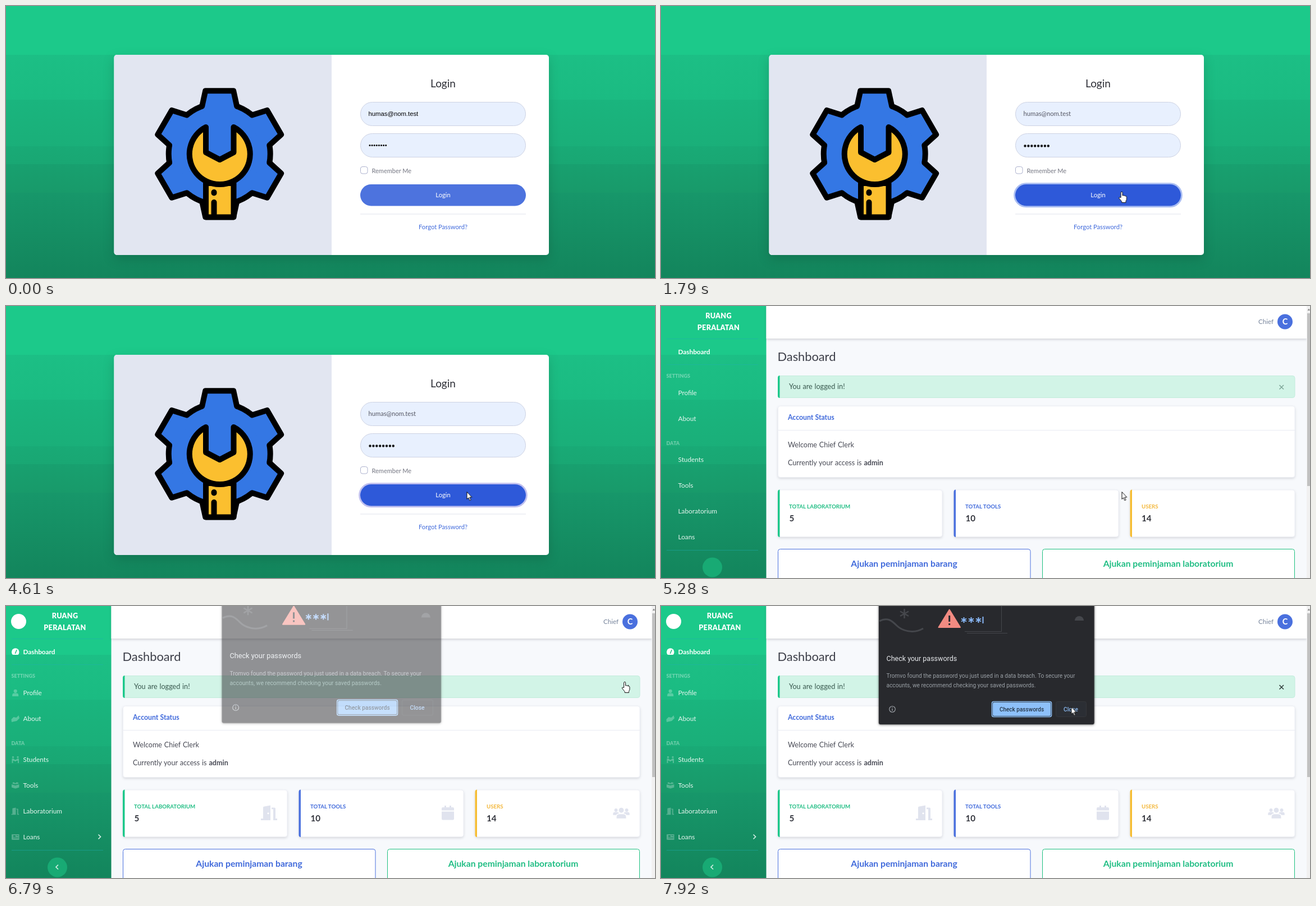
Write an HTML page that moves like this. It is 1156 px wide and 485 px high and loops after 7990 ms.

```html
<!DOCTYPE html>
<html lang="en">
<head>
<meta charset="utf-8">
<title>Login to dashboard</title>
<style>
html, body { margin: 0; width: 100%; height: 100%; overflow: hidden; }
svg {
  display: block; width: 100vw; height: 100vh;
  background: linear-gradient(#1cc98a 87px, #1cbf85 87px, #1bbb82 167px, #1ab57e 167px, #1aaf79 250px,
    #19aa76 250px, #19a773 282px, #18a06f 282px, #189a6a 333px, #17976a 333px, #13855c 485px);
  font-family: Lato, "Open Sans", sans-serif;
}
text { white-space: pre; }
.mid { text-anchor: middle; }
.b { font-weight: 700; }
.white { fill: #fff; }
.blue { fill: #3f69db; }
.green { fill: #1fbd83; }
.amber { fill: #f3b73a; }
.body { font-size: 12.6px; word-spacing: .6px; fill: #484a55; }
.small { font-size: 11.2px; }
.brand { font-size: 12.6px; font-weight: 900; letter-spacing: .3px; }
.nav { font-size: 11.8px; fill: #e6f6ef; }
.head { font-size: 9px; font-weight: 900; fill: #fff; opacity: .36; }
.label { font-size: 9.7px; font-weight: 700; }
.value { font-size: 15.2px; font-weight: 700; fill: #33353d; }
.cta { font-size: 15.7px; font-weight: 700; }
.card { fill: #fff; stroke: #edeff5; filter: drop-shadow(0 2px 2px rgba(58, 59, 69, .16)); }
.panel { filter: drop-shadow(0 7px 10px rgba(0, 0, 0, .15)); }
.field { fill: #e8f0fe; stroke: #cdd2e3; }
.dots { stroke: #111; stroke-linecap: round; }
.rule { stroke: #1eaeb0; stroke-opacity: .5; }
.black { fill: none; stroke: #000; stroke-width: 10; stroke-linejoin: round; stroke-linecap: round; }
.sheet { fill: #28292d; filter: drop-shadow(0 0 1px rgba(0, 0, 0, .6)) drop-shadow(0 1px 2px rgba(0, 0, 0, .4)); }
.dialog-text { font-family: Roboto, "Open Sans", sans-serif; }

/* 1% of the loop is 79.9 ms */
.login, .dash, .before, .after, .icons, .brand-box, .thumb, .cross, .dialog, .close-bg, .cursor, .arrow, .hand {
  animation: 7990ms step-end infinite;
}
.btn, .ring { animation: 7990ms linear infinite; }

.login { animation-name: leave; }
.dash { animation-name: enter; }
@keyframes leave { 0% { visibility: visible } 66.08%, 100% { visibility: hidden } }
@keyframes enter { 0% { visibility: hidden } 66.08%, 100% { visibility: visible } }

.before { animation-name: before; }
.after { animation-name: after; }
@keyframes before { 0% { opacity: 1 } 18.77%, 100% { opacity: 0 } }
@keyframes after { 0% { opacity: 0 } 18.77%, 100% { opacity: 1 } }

.btn { animation-name: hover; }
@keyframes hover { 0%, 11.2% { fill: #4d73de } 13.1%, 100% { fill: #2e59d9 } }
.ring { animation-name: focus; }
@keyframes focus {
  0%, 18.7% { stroke: #a9bdf2; opacity: 0 }
  20.6%, 56.8% { stroke: #a9bdf2; opacity: 1 }
  57.6%, 100% { stroke: #bfbfef; opacity: 1 }
}

.icons { animation-name: icons; }
@keyframes icons { 0% { opacity: 0 } 79.84%, 100% { opacity: 1 } }
.brand-box { animation-name: nudge; }
@keyframes nudge { 0% { transform: translateX(-2.5px) } 79.84%, 100% { transform: none } }
.thumb { animation-name: thumb; }
@keyframes thumb { 0% { height: 308px } 69.46%, 100% { height: 292px } }
.cross { animation-name: cross; }
@keyframes cross { 0% { stroke: #7ea597 } 81.6%, 100% { stroke: #2c3b36 } }

.dialog { animation-name: pop; transform-origin: 579.5px 0; }
@keyframes pop {
  0% { opacity: 0 }
  84.1% { opacity: .03; transform: translateY(-10px) scale(1.03) }
  84.98% { opacity: .5; transform: translateY(-6px) scale(1.017) }
  85.85% { opacity: .97; transform: translateY(-2px) scale(1.005) }
  86.6% { opacity: 1; transform: translateY(-.7px) scale(1.002) }
  87.35%, 100% { opacity: 1; transform: none }
}
.close-bg { animation-name: close-bg; }
@keyframes close-bg { 0% { fill: #28292d } 98.24%, 100% { fill: #2b2e34 } }

.cursor { animation-name: move; }
@keyframes move {
  0% { opacity: 0; transform: translate(1033px, 425px) }
  6.5% { opacity: 1; transform: translate(1033px, 425px) }
  7.19% { opacity: 1; transform: translate(960px, 382px) }
  7.88% { opacity: 1; transform: translate(922px, 361px) }
  11.26% { opacity: 1; transform: translate(905px, 354px) }
  12.07% { opacity: 1; transform: translate(870px, 343px) }
  12.95% { opacity: 1; transform: translate(845px, 336px) }
  13.76% { opacity: 1; transform: translate(828px, 332px) }
  14.64% { opacity: 1; transform: translate(820.5px, 331px) }
  75.71% { opacity: 1; transform: translate(930px, 210px) }
  76.53% { opacity: 1; transform: translate(1060px, 105px) }
  77.34% { opacity: 1; transform: translate(1087px, 79px) }
  79.84% { opacity: 1; transform: translate(1092px, 98px) }
  80.72% { opacity: 1; transform: translate(1098px, 118px) }
  81.6% { opacity: 1; transform: translate(1101px, 130px) }
  83.22% { opacity: 1; transform: translate(1102px, 135px) }
  85.85% { opacity: 1; transform: translate(1102px, 136px) }
  87.35% { opacity: 1; transform: translate(1102px, 138px) }
  92.36% { opacity: 1; transform: translate(1030px, 146px) }
  93.11% { opacity: 1; transform: translate(900px, 160px) }
  93.99% { opacity: 1; transform: translate(812px, 172px) }
  94.74% { opacity: 1; transform: translate(775px, 165px) }
  97.37% { opacity: 1; transform: translate(756px, 172px) }
  98.24% { opacity: 1; transform: translate(738px, 178px) }
  99.12%, 100% { opacity: 1; transform: translate(730.5px, 179.5px) }
}
.arrow { animation-name: arrow; }
.hand { animation-name: hand; }
@keyframes arrow {
  0% { visibility: visible } 12.07% { visibility: hidden } 56.82% { visibility: visible }
  81.6% { visibility: hidden } 92.36%, 100% { visibility: visible }
}
@keyframes hand {
  0% { visibility: hidden } 12.07% { visibility: visible } 56.82% { visibility: hidden }
  81.6% { visibility: visible } 92.36%, 100% { visibility: hidden }
}
</style>
</head>
<body>
<svg viewBox="0 0 1156 485" preserveAspectRatio="none">
  <defs>
    <g id="tooth">
      <path fill="#3477e4" d="M-31-85L-25-112.5H25L31-85L28-74H-28Z"/>
      <path class="black" d="M-31-85L-25-112.5H25L31-85"/>
    </g>
    <g id="door">
      <path d="M0 23H4V2Q4 0 6 0L17-2V26H0ZM19 2H24Q26 2 26 4V23H29V26H22V5H19Z"/>
      <circle cx="13" cy="13" r="1.6" fill="#fff"/>
    </g>
    <g id="person"><circle cy="-3.2" r="3.1"/><path d="M-5.5 6V4Q-5.5.6-2 .6H2Q5.5.6 5.5 4V6Z"/></g>
  </defs>

  <g class="login">
    <g class="panel">
      <rect x="192.5" y="87" width="774.5" height="357" rx="5" fill="#fff"/>
      <path fill="#e2e6f1" d="M580 87H197.5a5 5 0 0 0-5 5V439a5 5 0 0 0 5 5H580Z"/>
    </g>

    <g transform="translate(380.2 263.8)">
      <circle r="90.5" fill="#3477e4" stroke="#000" stroke-width="10"/>
      <use href="#tooth"/>
      <use href="#tooth" transform="rotate(60)"/>
      <use href="#tooth" transform="rotate(120)"/>
      <use href="#tooth" transform="rotate(180)"/>
      <use href="#tooth" transform="rotate(240)"/>
      <use href="#tooth" transform="rotate(300)"/>
    </g>
    <g fill="#fbbf2f">
      <path class="black" style="fill:inherit" d="M356 316H405.5V376.5H356Z"/>
      <path class="black" style="fill:inherit" d="M356 216V261L380.7 274L405.5 261V216A54 54 0 1 1 356 216Z"/>
    </g>
    <path class="black" d="M370.5 332v1.5M370.5 350V371"/>

    <text class="mid" x="778.5" y="145" font-size="19" fill="#2f3038">Login</text>
    <rect class="field" x="631.5" y="171.5" width="294" height="42" rx="21"/>
    <rect class="field" x="631.5" y="227.5" width="294" height="42" rx="21"/>
    <g class="before">
      <text x="645.5" y="196" font-size="11.3" font-family="'Liberation Sans', Arial, sans-serif">humas@nom.test</text>
      <path class="dots" d="M648 248.5H677" stroke-width="3.2" stroke-dasharray="0 4.1"/>
    </g>
    <g class="after">
      <text class="small" x="645.5" y="196" fill="#555763">humas@nom.test</text>
      <path class="dots" d="M648.5 249.5H690.5" stroke-width="4.4" stroke-dasharray="0 5.9"/>
    </g>
    <rect x="631.5" y="286.5" width="12.5" height="12.5" rx="3.5" fill="#fff" stroke="#adb2ce"/>
    <text x="651.5" y="298" font-size="11" fill="#747682">Remember Me</text>
    <rect class="ring" x="629.7" y="316.7" width="297.6" height="41" rx="20.5" fill="none" stroke-width="3"/>
    <rect class="btn" x="631" y="318" width="295" height="38.5" rx="19.25"/>
    <text class="small mid white" x="778.5" y="341">Login</text>
    <path d="M631 371H926" stroke="#e1e3ec"/>
    <text class="small mid blue" x="778.5" y="398">Forgot Password?</text>
  </g>

  <g class="dash">
    <rect x="187.5" width="969" height="485" fill="#f7f9fc"/>
    <rect x="187.5" y="-6" width="963" height="64" fill="#fff" style="filter:drop-shadow(0 2px 2px rgba(58,59,69,.2))"/>

    <g class="brand-box">
      <text class="brand mid white" x="105" y="22">RUANG</text>
      <text class="brand mid white" x="105" y="43">PERALATAN</text>
    </g>
    <path class="rule" d="M10 58.5H173M10 104.5H173M10 435.5H173"/>
    <text class="nav b" style="fill:#fff" x="30.5" y="86">Dashboard</text>
    <text class="head" x="9.5" y="128">SETTINGS</text>
    <text class="nav" x="30.5" y="159">Profile</text>
    <text class="nav" x="30.5" y="205">About</text>
    <text class="head" x="9.5" y="248">DATA</text>
    <text class="nav" x="30.5" y="278">Students</text>
    <text class="nav" x="30.5" y="324">Tools</text>
    <text class="nav" x="30.5" y="370">Laboratorium</text>
    <text class="nav" x="30.5" y="416">Loans</text>
    <circle cx="91.5" cy="466" r="17.5" fill="#18aa74"/>

    <text x="1091" y="32" text-anchor="end" font-size="11.5" fill="#74829a">Chief</text>
    <circle cx="1111.5" cy="28" r="13.5" fill="#4a70de"/>
    <text class="mid b white" x="1111.5" y="33" font-size="14.5">C</text>

    <text x="207.5" y="97.5" font-size="21.8" fill="#3d3f49">Dashboard</text>
    <rect x="208.5" y="124.5" width="920.5" height="39" rx="4" fill="#d2f4e7" stroke="#c2ecdb"/>
    <path fill="#1cc88a" d="M211.5 124V164Q208 164 208 160V128Q208 124 211.5 124Z"/>
    <text class="body" style="fill:#38584e" x="228" y="148">You are logged in!</text>
    <path class="cross" d="M1101.5 141l7.5 7.5m0-7.5l-7.5 7.5" stroke-width="1.5"/>

    <rect class="card" x="208.5" y="178.5" width="920.5" height="127" rx="4"/>
    <path d="M209 221.5H1129" stroke="#e9ebf2"/>
    <text class="b blue" x="226" y="203" font-size="12.3">Account Status</text>
    <text class="body" x="226" y="252">Welcome Chief Clerk</text>
    <text class="body" x="226" y="283.5">Currently your access is <tspan class="b">admin</tspan></text>

    <rect class="card" x="208.5" y="328" width="292.5" height="83.5" rx="4"/>
    <rect class="card" x="522" y="328" width="293" height="83.5" rx="4"/>
    <rect class="card" x="836" y="328" width="293" height="83.5" rx="4"/>
    <path fill="#1cc88a" d="M211.5 327.5V412Q208 412 208 408V331.5Q208 327.5 211.5 327.5Z"/>
    <path fill="#4a70de" d="M525 327.5V412Q521.5 412 521.5 408V331.5Q521.5 327.5 525 327.5Z"/>
    <path fill="#f6bd33" d="M839 327.5V412Q835.5 412 835.5 408V331.5Q835.5 327.5 839 327.5Z"/>
    <text class="label green" x="228" y="361">TOTAL LABORATORIUM</text>
    <text class="label blue" x="542" y="361">TOTAL TOOLS</text>
    <text class="label amber" x="856" y="361">USERS</text>
    <text class="value" x="228.5" y="383.5">5</text>
    <text class="value" x="542.5" y="383.5">10</text>
    <text class="value" x="856" y="383.5">14</text>

    <rect x="208.5" y="433.5" width="449.5" height="80" rx="4" fill="#fff" stroke="#4a70de"/>
    <rect x="679.5" y="433.5" width="449" height="80" rx="4" fill="#fff" stroke="#1cc07f"/>
    <text class="cta mid blue" x="433" y="465">Ajukan peminjaman barang</text>
    <text class="cta mid green" x="903.5" y="465">Ajukan peminjaman laboratorium</text>

    <g class="icons">
      <circle class="white" cx="22.5" cy="27.5" r="13.5"/>
      <path class="white" d="M12 87Q10 85 10 82A6.7 6.7 0 0 1 23.5 82Q23.5 85 21.5 87Z"/>
      <path d="M16.5 84.5L19 78.5" stroke="#1cbf85" stroke-width="1.5" stroke-linecap="round"/>
      <g fill="#fff" opacity=".27">
        <use href="#person" x="16.7" y="155"/>
        <path d="M9.5 202l4-4 5 1 4-4 1.5 5-5 5-5 1-4 1z"/>
        <circle cx="12.5" cy="269.5" r="1.7"/><circle cx="21" cy="269.5" r="1.7"/>
        <path d="M10.5 272h3l2 2h2.5l2-2h3v8h-2v-4h-3v1h-3v-1h-2.5v4h-2z"/>
        <path d="M10 318l6.7 2 6.7-2v5.5l-6.7 2-6.7-2zM11 316l2.5-2 3 2 3-2 3.5 2-3 1.5h-6z"/>
        <use href="#door" transform="translate(9.5 360.5) scale(.47 .45)"/>
        <path fill-rule="evenodd" d="M10 408q0-1 1-1h12.5v10h-12q-1.5 0-1.5-1.5zM13 409v2.5h4v-2.5zM18.5 409v1h3.5v-1zM13 413v1h9v-1z"/>
      </g>
      <path d="M164.5 407.5l4 4-4 4M93 461.5l-4 4 4 4" fill="none" stroke="#d4eee3" stroke-width="1.7"/>
      <g fill="#e0e3ee">
        <use href="#door" transform="translate(454 357.5) scale(1 .94)"/>
        <path d="M776 364.5V361q0-2 2-2h3v-3h3v3h6v-3h3v3h3q2 0 2 2v3.5zM776 366.5h22v13q0 2-2 2h-18q-2 0-2-2z"/>
        <use href="#person" transform="translate(1086.5 367) scale(.95)"/>
        <use href="#person" transform="translate(1105.5 367) scale(.95)"/>
        <use href="#person" transform="translate(1096 369.5) scale(1.65)" stroke="#fff" stroke-width=".8"/>
      </g>
    </g>

    <rect x="1150" width="6" height="485" fill="#f1f1f1"/>
    <path d="M1151.5 8l2.5-3.5 2 3.5z" fill="#8a8a8a"/>
    <rect class="thumb" x="1151" y="13" width="5" fill="#c1c1c1"/>
  </g>

  <g class="dialog dialog-text">
    <path class="sheet" d="M388 -12H771.5V208q0 3-3 3H391q-3 0-3-3Z"/>
    <g fill="none" stroke="#45474c" stroke-width="3">
      <path d="M389 27C404 19 412 27 420 35S448 51 467 40"/>
      <path d="M433.500 5V22M426 9.500l15 8.500M441 9.500l-15 8.500" stroke-width="2.500"/>
      <path d="M606.500 0V45.500H541M617 48.500H545" stroke-width="1"/>
    </g>
    <path d="M737 26a8 8 0 0 1 16 0z" fill="#45474c"/>
    <path d="M513.700 6.500L533 38H494.500Z" fill="#f28b82" stroke="#f28b82" stroke-width="2" stroke-linejoin="round"/>
    <path d="M513.700 17V28M513.700 31V34" stroke="#28292d" stroke-width="3"/>
    <g stroke="#8ab9f8" stroke-width="2">
      <path id="star" d="M539.500 20v10M535 22.500l9 5M544 22.500l-9 5"/>
      <use href="#star" x="13"/>
      <use href="#star" x="26"/>
      <path d="M573.500 19V31"/>
    </g>
    <text x="401.500" y="97.500" font-size="12.500" fill="#e8eaed">Check your passwords</text>
    <g font-size="10.200" fill="#9aa0a6">
      <text x="401.500" y="128">Tromvo found the password you just used in a data breach. To secure your</text>
      <text x="401.500" y="145">accounts, we recommend checking your saved passwords.</text>
    </g>
    <circle cx="412" cy="184" r="5.300" fill="none" stroke="#a5aab0" stroke-width="1.100"/>
    <path d="M412 183V187M412 180.500V181.800" stroke="#a5aab0" stroke-width="1.200"/>
    <rect x="589.500" y="170.500" width="106" height="27" rx="3" fill="#28292d" stroke="#8ec2fa" stroke-width="1.600"/>
    <rect x="591" y="172" width="103" height="24" rx="2" fill="#8dc0fa"/>
    <text class="mid" x="642.500" y="187.500" font-size="10" font-weight="500" fill="#26374a">Check passwords</text>
    <rect class="close-bg" x="703.500" y="170.500" width="54" height="27" rx="3" stroke="#35373b"/>
    <text class="mid" x="730" y="187.500" font-size="10.200" font-weight="500" fill="#8ab9f0">Close</text>
  </g>

  <g class="cursor" fill="#fff" stroke="#111" stroke-linejoin="round">
    <path class="arrow" d="M.5.5V13.500L3.400 10.800L5.400 15.800L7.500 14.900L5.400 10H9.300Z"/>
    <path class="hand" d="M-1.400 10.500V1.800a1.500 1.500 0 0 1 3 0V7q1.700-1.100 2.700.4 1.700-.9 2.500.6 2-.4 2.100 1.600v4.500l-1.500 3.200V19.500H.2v-1.800l-4.600-5.700q-.8-2.200.9-1.900z"/>
  </g>
</svg>
</body>
</html>
```
